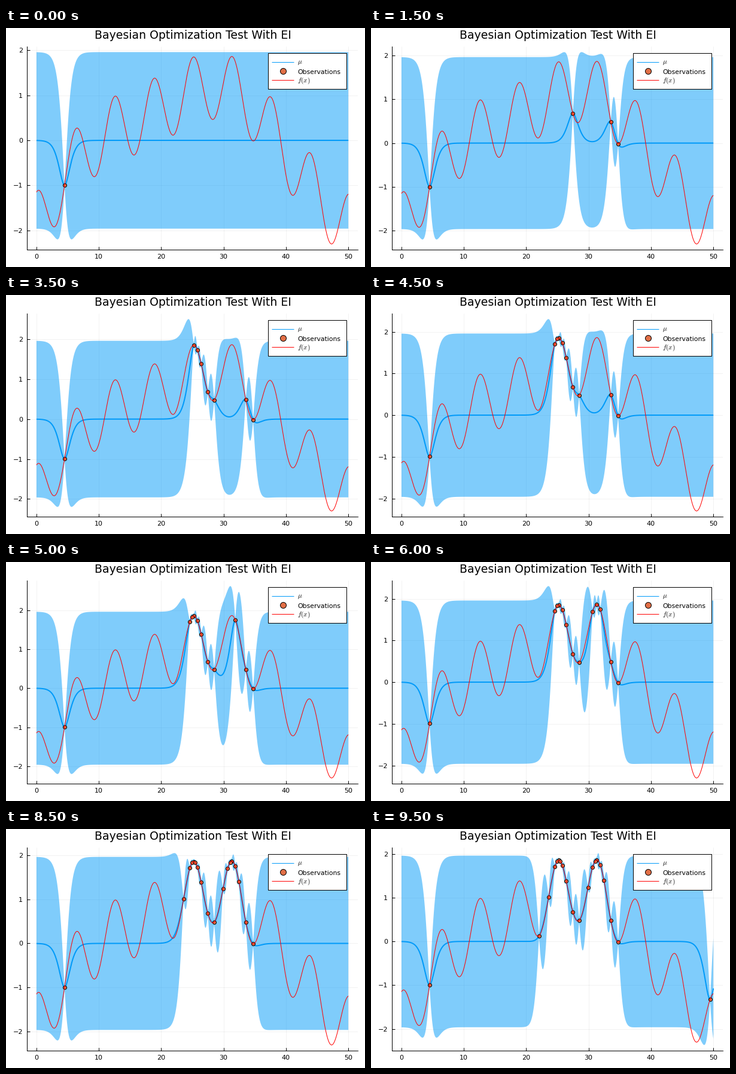
These frames come from a looping animation (600 by 400 pixels, 10 s). A matplotlib script:

```python
import matplotlib.pyplot as plt
import numpy as np
from matplotlib.animation import FuncAnimation
from matplotlib.patches import Rectangle

plt.rcParams.update({"font.family": "DejaVu Sans", "mathtext.fontset": "cm"})

WIDTH, HEIGHT, DPI = 600, 400, 100
PX = 72 / DPI  # points per pixel
BLUE, ORANGE, RED = "#009af9", "#e26f46", "#ff0000"
NOISE = 1e-3

# Sample positions in the order the optimiser visits them.
SAMPLES = np.array([
    4.5, 33.56, 34.73, 27.48, 28.48, 26.41, 25.79, 25.22, 24.59, 24.98,
    31.87, 31.28, 30.65, 29.9, 32.46, 23.58, 31.05, 25.45, 22.05, 49.47,
])


def objective(x):
    return (3 * np.sin(2 * np.pi * x / 100) + 0.25 * np.sin(x / 4)
            + 0.75 * np.cos(x) - 1.9)


def matern52(a, b):
    s = np.sqrt(5) * np.abs(a[:, None] - b[None, :])
    return (1 + s + s**2 / 3) * np.exp(-s)


def posterior(x, seen):
    """Mean and 95 % half width of a unit Gaussian process."""
    cov = matern52(seen, seen) + NOISE * np.eye(len(seen))
    cross = matern52(x, seen)
    weights = np.linalg.solve(cov, cross.T)
    mean = weights.T @ objective(seen)
    var = 1 - np.sum(cross * weights.T, axis=1)
    return mean, 1.96 * np.sqrt(np.clip(var, 0, None))


grid = np.linspace(0, 50, 1001)
truth = objective(grid)

fig = plt.figure(figsize=(WIDTH / DPI, HEIGHT / DPI), dpi=DPI, facecolor="white")
ax = fig.add_axes([35.3 / WIDTH, 28.9 / HEIGHT, 552.5 / WIDTH, 340.4 / HEIGHT])
ax.set_xlim(-1.5, 51.5)
ax.set_xticks(range(0, 51, 10))
ax.set_yticks(range(-2, 3))
ax.spines[["top", "right"]].set_visible(False)
ax.spines[["left", "bottom"]].set_linewidth(PX)
ax.tick_params(direction="in", length=5 * PX, width=PX, labelsize=11.1 * PX)
ax.tick_params(axis="x", pad=7 * PX)
ax.tick_params(axis="y", pad=7 * PX)
ax.set_axisbelow(True)
ax.grid(color="black", alpha=0.1, linewidth=0.5 * PX)

dot_style = dict(marker="o", ls="", mfc=ORANGE, mec="black", mew=PX, snap=False)
ribbon, = ax.fill([0, 50, 50], [0, 0, 1], color=BLUE, alpha=0.5, linewidth=0, zorder=2)
mean_line, = ax.plot([], [], color=BLUE, lw=2 * PX, solid_capstyle="butt", zorder=3)
dots, = ax.plot([], [], ms=6 * PX, zorder=4, **dot_style)
ax.plot(grid, truth, color=RED, lw=PX, solid_capstyle="butt", zorder=5)

# Title and legend live on a layer measured in pixels from the top left.
layer = fig.add_axes([0, 0, 1, 1], zorder=5)
layer.set_xlim(0, WIDTH)
layer.set_ylim(HEIGHT, 0)
layer.axis("off")


def label(x, y, text, size, **kw):
    layer.text(x, y, text, fontsize=size * PX, va="baseline", **kw)


label(312, 18, "Bayesian Optimization Test With EI", 18.9, ha="center")
layer.add_patch(Rectangle((438.1, 42.1), 131, 60, fc="white", ec="black", lw=PX))
for y, color in ((57.1, BLUE), (87.1, RED)):
    layer.plot([444.1, 481.1], [y, y], color=color, lw=PX, solid_capstyle="butt")
layer.plot(462.5, 72.4, ms=10 * PX, **dot_style)
label(487, 60, r"$\mu$", 11.2)
label(487, 77, "Observations", 10.9)
label(487, 91, "$f(x)$", 11.2)


def update(step):
    seen = SAMPLES[:step + 1]
    mean, half = posterior(grid, seen)
    low, high = mean - half, mean + half
    ribbon.set_xy(np.column_stack([np.r_[grid, grid[::-1]], np.r_[high, low[::-1]]]))
    mean_line.set_data(grid, mean)
    dots.set_data(seen, objective(seen))
    bottom, top = min(low.min(), truth.min()), max(high.max(), truth.max())
    margin = 0.03 * (top - bottom)
    ax.set_ylim(bottom - margin, top + margin)
    return ribbon, mean_line, dots


anim = FuncAnimation(fig, update, frames=len(SAMPLES), interval=500,
                     init_func=lambda: update(0), repeat=True, repeat_delay=0)
plt.show()
```
